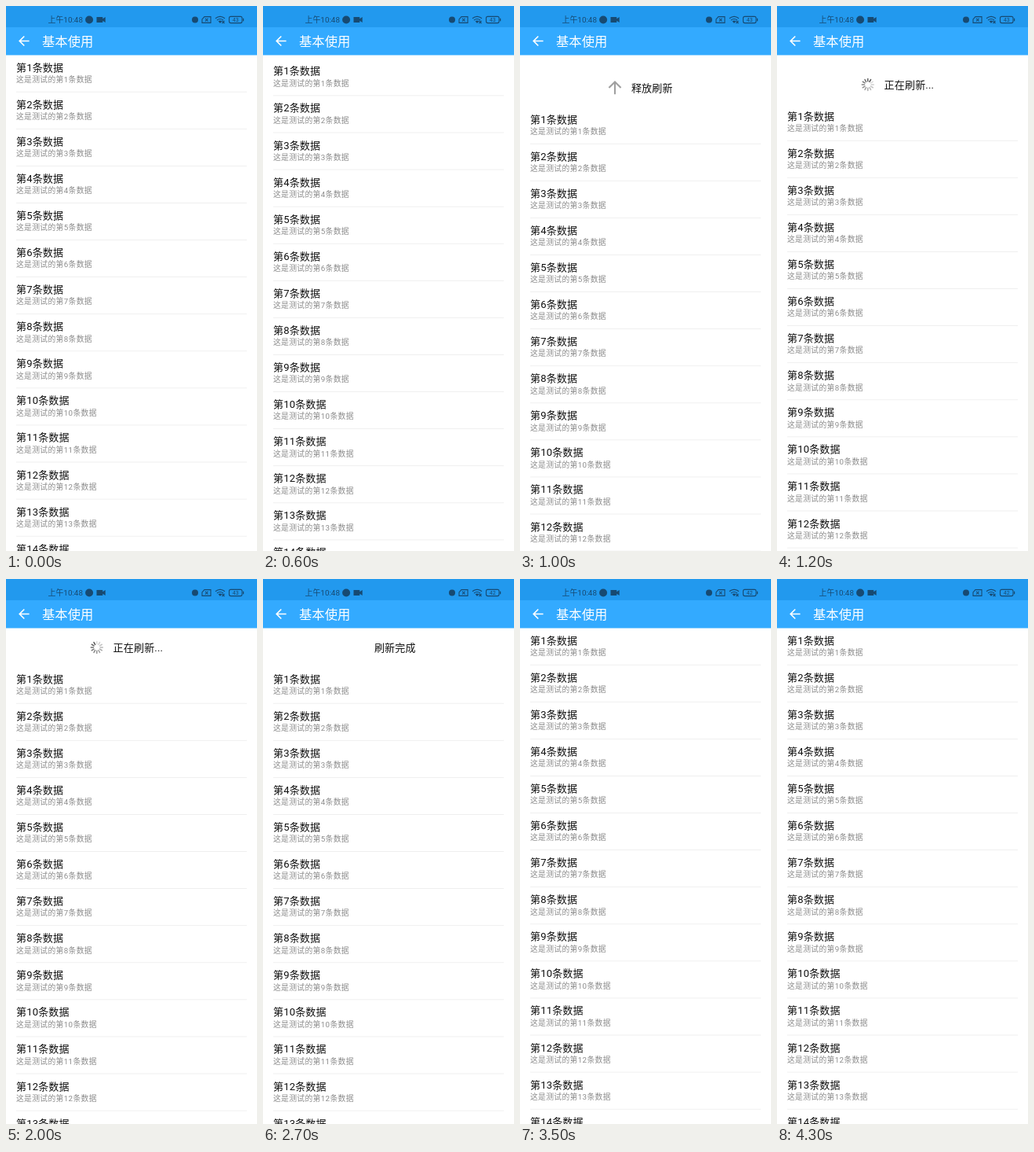
An HTML page that plays this animation: 320 by 693 pixels, repeating every 4400 ms.

```html
<!DOCTYPE html>
<html lang="zh-CN">
<head>
<meta charset="utf-8">
<style>
html, body { margin: 0; width: 100%; height: 100%; overflow: hidden; background: #fff }
svg { display: block; width: 320px; height: 693px; font-family: Roboto, "Noto Sans CJK SC", "Noto Sans CJK", sans-serif }
.title { font-size: 13.07px; letter-spacing: .01em; fill: #111 }
.note { font-size: 9.8px; letter-spacing: .0333em; fill: #8c8c8c }
.line { fill: none; stroke-width: 1.1 }
</style>
</head>
<body>
<svg viewBox="0 0 320 693">
  <g id="list"></g>
  <g id="header">
    <text id="label" class="title" x="168.3" y="4.5" text-anchor="middle"></text>
    <path id="arrow" d="M0 8.2V-7M-7.6 0L0-7.6L7.6 0" fill="none" stroke="#a0a0a0" stroke-width="2.1"/>
    <g id="spinner"></g>
  </g>
  <path fill="#2299ee" d="M0 0H320V27H0z"/>
  <path fill="#33aaff" d="M0 27H320V62.5H0z"/>
  <path d="M29.6 44.5H17.5M23.3 38.5L17.3 44.5L23.3 50.5" fill="none" stroke="#fff" stroke-width="1.7"/>
  <text x="46" y="51.4" font-size="16.33" fill="#fff">基本使用</text>
  <g fill="#174a72" stroke="#174a72" stroke-width="0">
    <text x="53.6" y="21" font-size="9.9">上午10:48</text>
    <circle cx="106.1" cy="17.5" r="5"/>
    <path d="M115.5 14H123.3V16.3L126.7 14V21L123.3 18.7V21H115.5z"/>
    <circle cx="241" cy="17.5" r="4"/>
    <path class="line" d="M253 13.6H261V21.4H250V17zM254 15.8L257.6 19.4M257.6 15.8L254 19.4"/>
    <path class="line" d="M267 15.8Q273 11 279 15.8M269 18Q273 15 277 18"/>
    <path d="M270.6 19.2Q273 17.6 275.4 19.2L273 22z"/>
    <path class="line" d="M275.5 19L278.5 22M278.5 19L275.5 22"/>
    <rect class="line" x="284.5" y="13.4" width="16.5" height="8.2" rx="2"/>
    <path d="M302 15.7H303.2V19.3H302z"/>
    <text id="battery" x="292.8" y="20.1" font-size="7" text-anchor="middle"></text>
  </g>
</svg>
<script>
const $ = id => document.getElementById(id);
const LOOP = 4400, STEP = 100, HEIGHT = 49, PITCH = 47.08;
const clamp = x => Math.min(1, Math.max(0, x));

// [time, pull distance]
const pull = [[0, 0], [500, 0], [600, 4.7], [700, 22], [800, 41], [900, 56], [1000, 66],
  [1100, 69], [1200, 62], [1300, 52], [1400, HEIGHT], [2900, HEIGHT], [3000, 8.6], [3100, 1], [3200, 0], [LOOP, 0]];

function pullAt(t) {
  const i = pull.findIndex(p => p[0] > t);
  const [t0, y0] = pull[i - 1], [t1, y1] = pull[i];
  return y0 + (y1 - y0) * (t - t0) / (t1 - t0);
}

let rows = '';
for (let i = 0; i < 14; i++) {
  const name = `第${i + 1}条数据`;
  rows += `<g transform="translate(13 ${62.5 + i * PITCH})">
    <text class="title" y="20.2">${name}</text>
    <text class="note" y="34.5">这是测试的${name}</text>
    <rect y="46.3" width="294" height=".8" fill="#ececec"/></g>`;
}
$('list').innerHTML = rows;

let bars = '';
for (let i = 0; i < 12; i++)
  bars += `<path d="M0-4.3V-7.5" stroke="#555" stroke-width="1.5" stroke-linecap="round"
    opacity="${0.2 + 0.8 * i / 11}" transform="rotate(${i * 30})"/>`;
$('spinner').innerHTML = bars;

const show = (id, on) => $(id).setAttribute('visibility', on ? 'visible' : 'hidden');
const move = (id, value) => $(id).setAttribute('transform', value);

function draw(t) {
  const y = pullAt(t);
  const pulling = t < 1200, refreshing = !pulling && t < 2500;
  move('list', `translate(0 ${y})`);
  move('header', `translate(0 ${62.5 + y - HEIGHT / 2})`);
  $('label').textContent = refreshing ? '正在刷新...' : !pulling ? '刷新完成' : t < 900 ? '下拉刷新' : '释放刷新';
  show('arrow', pulling);
  show('spinner', refreshing);
  move('arrow', `translate(121)rotate(${180 * (1 - clamp((t - 850) / 150))})`);
  move('spinner', `translate(115.8)rotate(${Math.floor(t * 12 / 1000) * 30})`);
  $('battery').textContent = t < 2500 ? 43 : 42;
}

const start = performance.now();
function tick() {
  const t = (performance.now() - start) % LOOP;
  draw(Math.floor(t / STEP) * STEP);
  requestAnimationFrame(tick);
}
tick();
</script>
</body>
</html>
```
